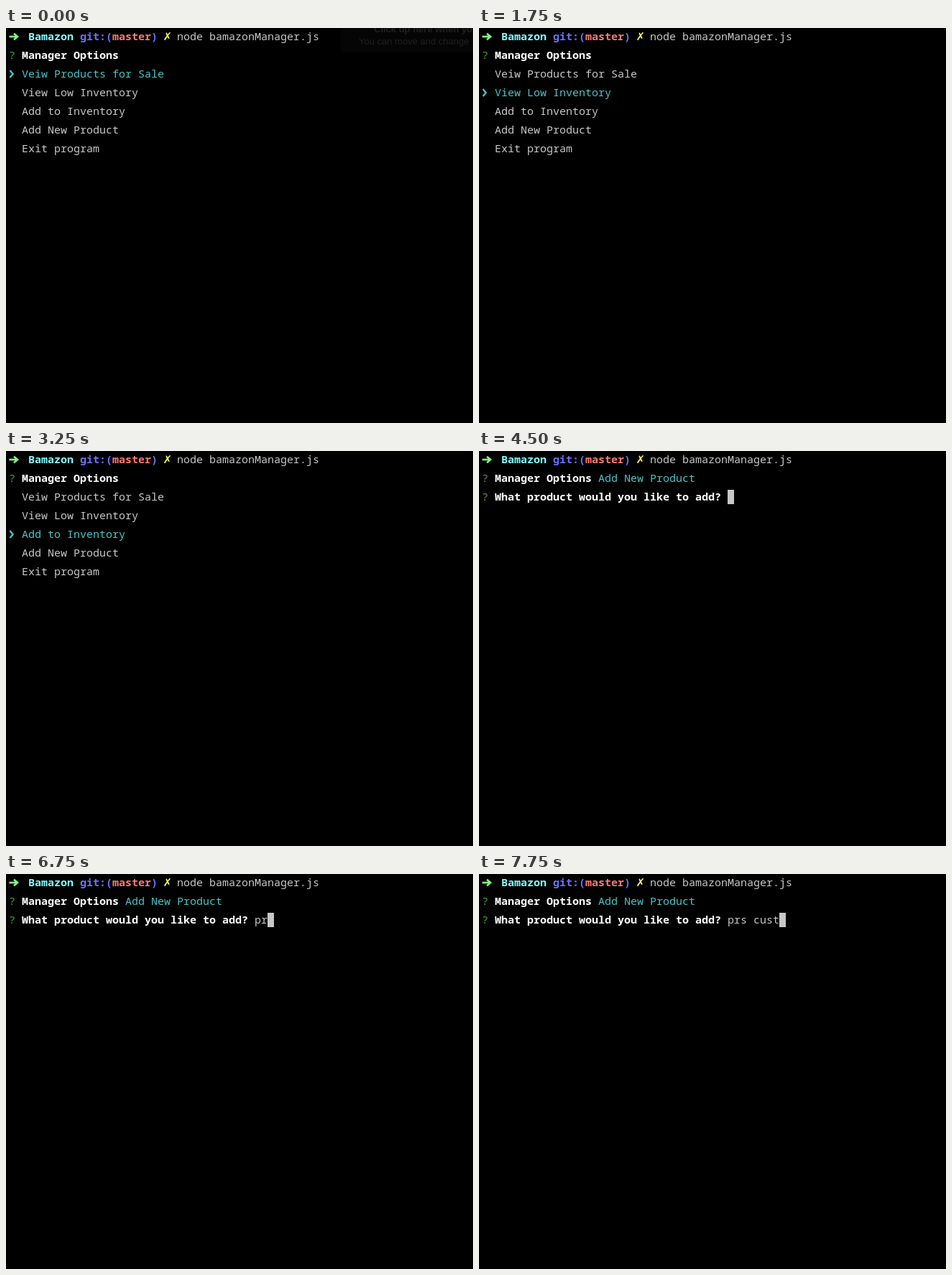
Animation, 650 px wide and 550 px high, one loop 8000 ms. Source, as an HTML page with a canvas:

```html
<!DOCTYPE html>
<html lang="en">
<head>
<meta charset="utf-8">
<style>
  html, body { margin: 0; width: 100%; height: 100%; overflow: hidden; background: #000; }
  canvas { display: block; }
</style>
</head>
<body>
<canvas id="stage" width="650" height="550"></canvas>
<script>
const ctx = document.getElementById('stage').getContext('2d');
const LOOP = 8000, CELL = 9, LEFT = 4, LINE = 26;
const MONO = '"Roboto Mono", "Noto Sans Mono", monospace';
const GREY = '#c7c7c7', WHITE = '#fff', CYAN = '#4cc3c5', GREEN = '#4a9f30', BLUE = '#6c71ff';
const MENU = ['Veiw Products for Sale', 'View Low Inventory', 'Add to Inventory',
              'Add New Product', 'Exit program'];
const ANSWER = 'prs cust';
const MOVES = [1750, 3250, 4000];
const PICKED = 4500;
// [time, number of letters typed]
const TYPED = [[6750, 2], [7000, 3], [7250, 4], [7500, 5], [7750, 8]];

const colX = col => LEFT + col * CELL;

function write(text, col, row, color, bold) {
  ctx.font = `${bold ? 'bold ' : ''}15px ${MONO}`;
  ctx.fillStyle = color;
  ctx.fillText(text, colX(col), 17 + row * LINE);
}

function stroke(points, color, width) {
  ctx.strokeStyle = color;
  ctx.lineWidth = width;
  ctx.beginPath();
  points.forEach(([x, y]) => ctx.lineTo(x, y));
  ctx.stroke();
}

function prompt() {
  const green = '#85f982';
  stroke([[4.5, 12], [15.5, 12]], green, 2.6);
  stroke([[11, 7.8], [16, 12], [11, 16.2]], green, 2.6);
  write('Bamazon', 3, 0, '#83fdff', true);
  write('git:(', 11, 0, BLUE, true);
  write('master', 16, 0, '#ff7a72', true);
  write(')', 22, 0, BLUE, true);
  ctx.font = 'bold 15px "DejaVu Sans", sans-serif';
  ctx.fillStyle = '#fffb70';
  ctx.fillText('✗', 218.5, 17);
  write('node bamazonManager.js', 26, 0, GREY);
}

function fadingNote() {
  ctx.fillStyle = '#050505';
  ctx.fillRect(466, 0, 184, 34);
  ctx.fillStyle = '#202020';
  ctx.font = 'bold 13px "Liberation Sans", sans-serif';
  ctx.fillText('Click up here when you', 512, 6);
  ctx.font = '13px "Liberation Sans", sans-serif';
  ctx.fillText('You can move and change', 491, 23);
}

function question(text, row) {
  write('?', 0, row, GREEN);
  write(text, 2, row, WHITE, true);
}

function menu(t) {
  const chosen = MOVES.filter(m => t >= m).length;
  MENU.forEach((label, i) => write(label, 2, i + 2, i === chosen ? CYAN : GREY));
  const y = 64 + chosen * LINE;
  stroke([[5.5, y - 5], [9.6, y], [5.5, y + 5]], CYAN, 2.4);
}

function answer(t) {
  const count = TYPED.reduce((n, [at, letters]) => t >= at ? letters : n, 0);
  write('Add New Product', 18, 1, CYAN);
  question('What product would you like to add?', 2);
  write(ANSWER.slice(0, count), 38, 2, GREY);
  ctx.fillStyle = GREY;
  ctx.fillRect(colX(38 + count), 54, CELL, 20);
}

function draw(t) {
  ctx.fillStyle = '#000';
  ctx.fillRect(0, 0, 650, 550);
  if (t < 250) fadingNote();
  prompt();
  question('Manager Options', 1);
  if (t < PICKED) menu(t);
  else answer(t);
}

const start = performance.now();
function frame() {
  draw((performance.now() - start) % LOOP);
  requestAnimationFrame(frame);
}
frame();
</script>
</body>
</html>
```
